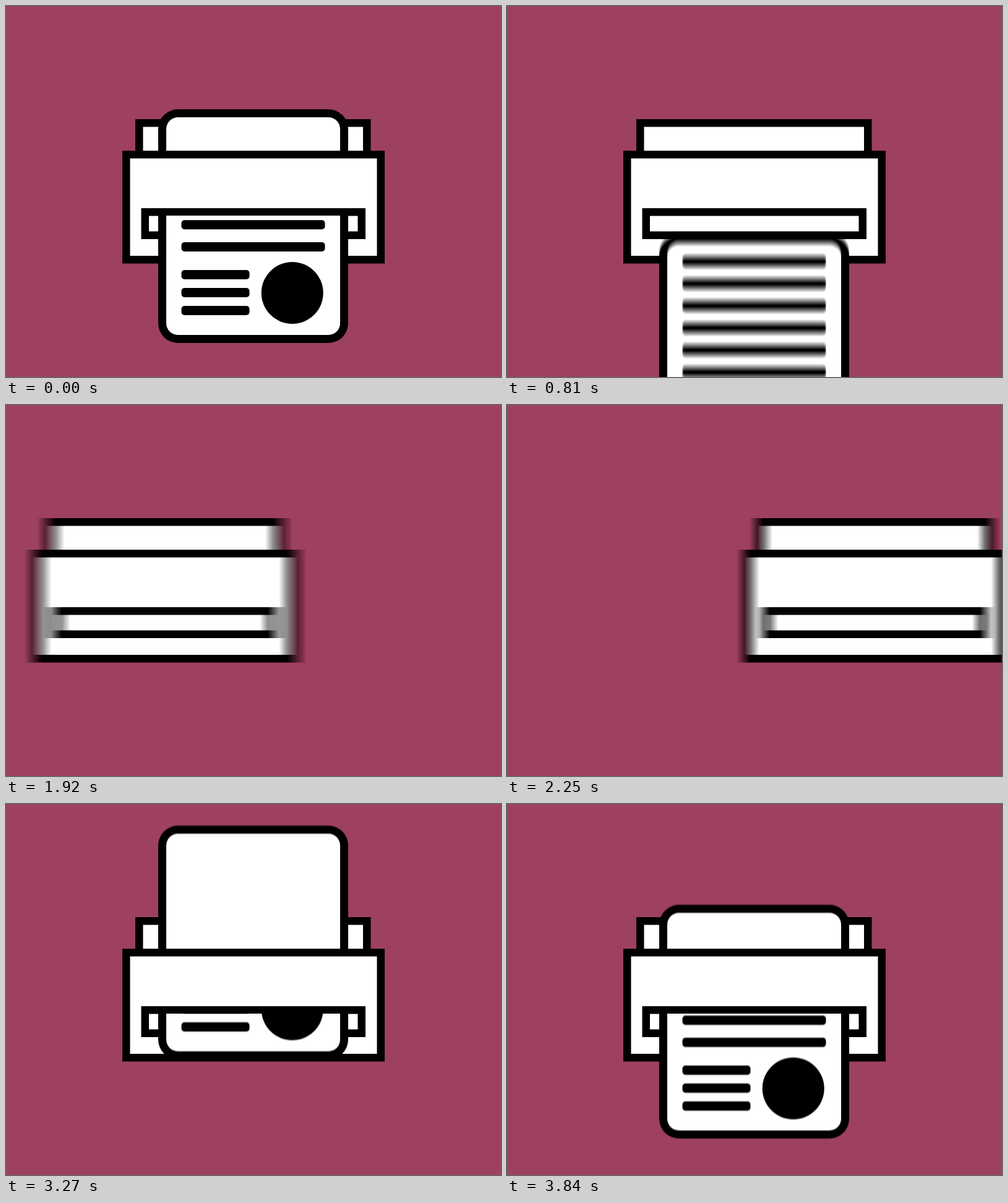
An HTML page with a canvas for the animation above (3870 ms loop, 800 px wide and 600 px high).

```html
<!DOCTYPE html>
<html lang="en">
<head>
<meta charset="utf-8">
<title>Printer</title>
<style>
  html, body { margin: 0; width: 100%; height: 100%; overflow: hidden; background: #9e4060; }
  canvas { display: block; }
</style>
</head>
<body>
<canvas id="stage" width="800" height="600"></canvas>
<script>
const LOOP = 3870, STEP = 30, SHUTTER = 13;
const OFFSTAGE = 1000;
const stage = document.getElementById('stage').getContext('2d');
const layer = document.createElement('canvas');
layer.width = 800;
layer.height = 600;
const ctx = layer.getContext('2d');

const progress = (t, from, to) => Math.min(1, Math.max(0, (t - from) / (to - from)));
const smooth = u => u * u * (3 - 2 * u);

// Top edge of the sheet: drops in, prints slowly, then slides out.
function paperTop(t) {
  if (t <= 1062) {
    return 167 + 0.139 * t + 292 * smooth(progress(t, 540, 1050) ** 1.566);
  }
  if (t < 2780) return OFFSTAGE;
  const feed = 35 + 0.2246 * (t - 3270);
  return Math.min(167, feed - 314 * (1 - smooth(progress(t, 2790, 3240))));
}

// Sideways offset of the printer: winds up, leaves left, returns from the right.
function printerShift(t) {
  if (t < 1640 || t > 2705) return 0;
  if (t < 1770) return 66 * smooth(progress(t, 1640, 1770));
  if (t < 2070) return 66 - 678 * progress(t, 1770, 2070) ** 1.7;
  if (t < 2490) return -66 + 261 * ((2490 - t) / 240) ** 1.7;
  return -66 * (1 - smooth(progress(t, 2490, 2705)));
}

function frame(left, top, right, bottom, radius = 0, border = 12.5) {
  for (const [inset, color] of [[0, '#000'], [border, '#fff']]) {
    ctx.fillStyle = color;
    ctx.beginPath();
    ctx.roundRect(left + inset, top + inset, right - left - 2 * inset,
      bottom - top - 2 * inset, Math.max(0, radius - inset));
    ctx.fill();
  }
}

function bar(y, width) {
  ctx.beginPath();
  ctx.roundRect(283.5, y - 7.5, width, 15, 5);
  ctx.fill();
}

function sheet(top, clipTop, clipBottom, printed) {
  ctx.save();
  ctx.beginPath();
  ctx.rect(0, clipTop, 800, clipBottom - clipTop);
  ctx.clip();
  frame(246, top, 553, top + 378, 32, 13);
  if (printed) {
    ctx.fillStyle = '#000';
    for (let i = 0; i < 6; i++) bar(top + 43.5 + 35.8 * i, 232);
    for (let i = 0; i < 3; i++) bar(top + 267.5 + 29 * i, 110);
    ctx.beginPath();
    ctx.arc(462.7, top + 297, 50, 0, 2 * Math.PI);
    ctx.fill();
  }
  ctx.restore();
}

function drawScene(top, shift) {
  ctx.fillStyle = '#9e4060';
  ctx.fillRect(0, 0, 800, 600);
  ctx.save();
  ctx.translate(shift, 0);
  frame(209, 183, 589.5, 300);
  if (top < OFFSTAGE) sheet(top, 0, 240, false);
  frame(188, 234, 612, 416.5);
  frame(218.5, 327, 581, 377);
  if (top < OFFSTAGE) sheet(top, 339, 600, true);
  ctx.restore();
}

// Averages several moments within the shutter time for motion blur.
function render(time) {
  const at = offset => (time + offset + LOOP) % LOOP;
  const start = at(-SHUTTER / 2), end = at(SHUTTER / 2);
  const travel = Math.max(Math.abs(paperTop(end) - paperTop(start)),
    Math.abs(printerShift(end) - printerShift(start)));
  const count = Math.min(24, Math.max(1, Math.ceil(travel)));
  for (let i = 0; i < count; i++) {
    const t = at(SHUTTER * ((i + 0.5) / count - 0.5));
    drawScene(paperTop(t), printerShift(t));
    stage.globalAlpha = 1 / (i + 1);
    stage.drawImage(layer, 0, 0);
  }
}

let shown = -1;
function tick() {
  const time = Math.floor(performance.now() % LOOP / STEP) * STEP;
  if (time !== shown) render(shown = time);
  requestAnimationFrame(tick);
}
tick();
</script>
</body>
</html>
```
